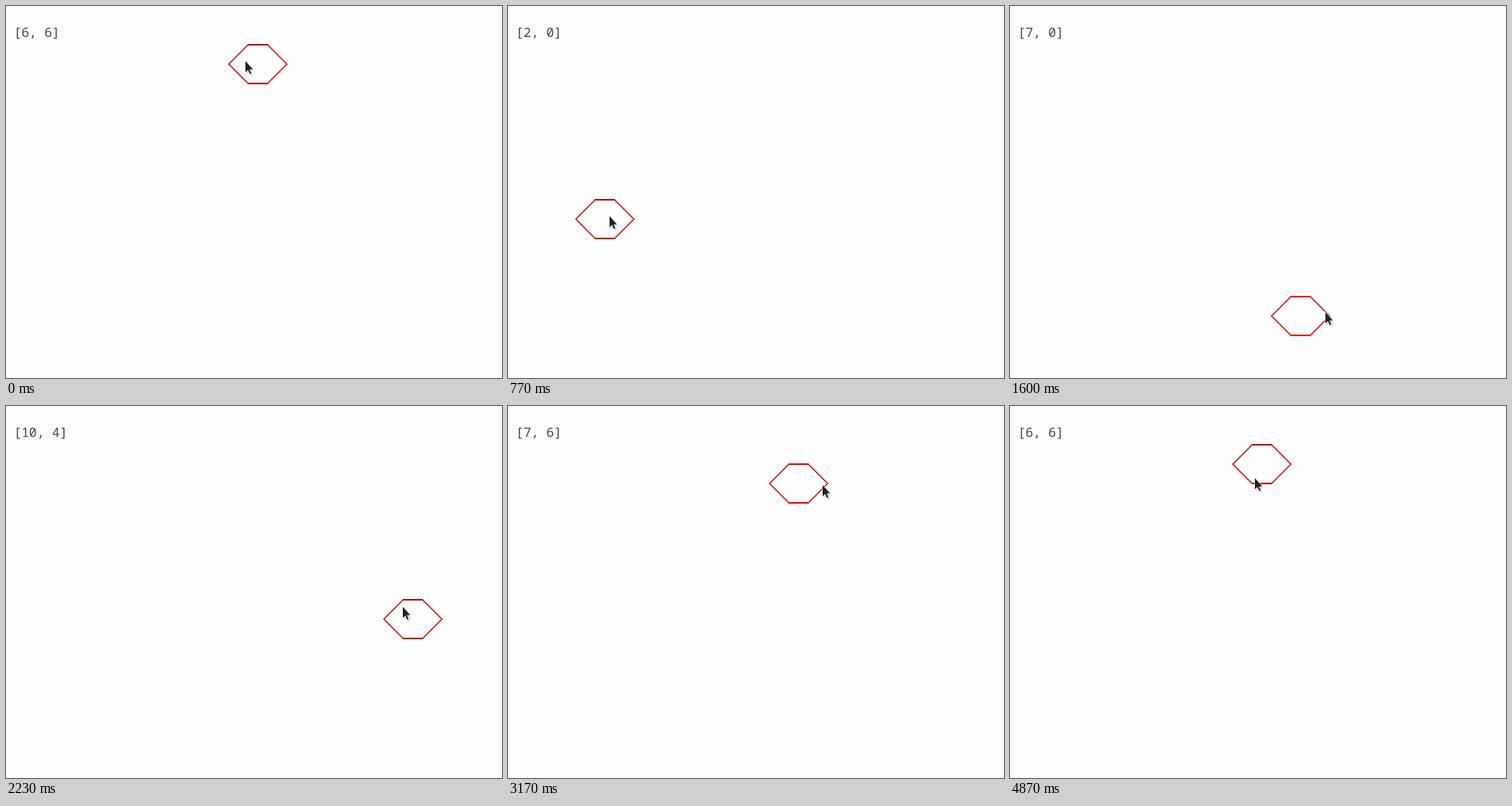
Recreate the animation shown at these times as an HTML page. Size 640 px wide and 480 px high, loop 6.76 s.

```html
<!DOCTYPE html>
<html lang="en">
<head>
<meta charset="utf-8">
<title>Hex grid picking</title>
<style>
  html, body { margin: 0; width: 100%; height: 100%; overflow: hidden; background: #fdfdfd; }
  svg { display: block; width: 640px; height: 480px; }
  text { font: 300 16.5px "Noto Sans Mono", "DejaVu Sans Mono", monospace; fill: #444; white-space: pre; }
  #cell { fill: none; stroke: #cc0a0a; stroke-width: 1.5; }
  #flats { stroke-width: 2; }
  #shadow { fill: #777; opacity: .5; filter: blur(1px); }
</style>
</head>
<body>
<svg viewBox="0 0 640 480">
  <defs>
    <path id="arrow" d="M0 0V14.5L3.3 11.5L5.6 16.8L7.6 16L5.3 10.8H9.6Z"/>
  </defs>
  <text id="label" x="10" y="40"></text>
  <g id="cell">
    <path d="M-12.5 -25L-37.5 0L-12.5 25M12.5 -25L37.5 0L12.5 25"/>
    <path id="flats" d="M-13 -25H13M-13 25H13"/>
  </g>
  <g id="pointer">
    <use id="shadow" href="#arrow" x="1.5" y="2"/>
    <use href="#arrow" fill="#222" stroke="#fff" stroke-width="1.2" paint-order="stroke"/>
  </g>
</svg>
<script>
const LOOP = 6760;

// Turning points of the pointer: time in ms, x, y
const path = [
  [0, 309, 70], [400, 165, 128], [770, 131, 271], [1060, 245, 345], [1350, 382, 411],
  [1600, 407, 394], [2080, 515, 305], [2230, 512, 259], [2670, 451, 167], [3400, 385, 89],
  [3730, 346, 97], [4000, 320, 102], [4660, 320, 102], [4870, 316, 92]
];

const label = document.getElementById("label");
const cell = document.getElementById("cell");
const flats = document.getElementById("flats");
const pointer = document.getElementById("pointer");

// Slope at a path point; zero where the value turns, so that rests stay still
function slope(i, k) {
  if (i === 0 || i === path.length - 1) return 0;
  const [a, b, c] = path.slice(i - 1, i + 2);
  const before = (b[k] - a[k]) / (b[0] - a[0]);
  const after = (c[k] - b[k]) / (c[0] - b[0]);
  return before * after > 0 ? 2 * before * after / (before + after) : 0;
}

function hermite(i, k, t) {
  const p = path[i], q = path[i + 1];
  const span = q[0] - p[0], u = (t - p[0]) / span, v = 1 - u;
  return v * v * ((1 + 2 * u) * p[k] + u * span * slope(i, k))
       + u * u * ((1 + 2 * v) * q[k] - v * span * slope(i + 1, k));
}

function position(t) {
  const i = path.findIndex(p => p[0] > t) - 1;
  if (i < 0) return path[path.length - 1].slice(1);
  return [hermite(i, 1, t), hermite(i, 2, t)].map(Math.round);
}

// The cell whose hexagon holds the point
function pick(x, y) {
  let best = { d: Infinity };
  const near = Math.round((x - 25) / 50);
  for (let a = near - 1; a <= near + 1; a++) {
    const b = Math.round((225 + 25 * a - y) / 50);
    const cx = 25 + 50 * a, cy = 225 + 25 * a - 50 * b;
    const dx = Math.abs(x - cx), dy = Math.abs(y - cy);
    const d = Math.max(dy / 25, (dx + dy) / 37.5);
    if (d < best.d) best = { d, a, b, cx, cy };
  }
  return best;
}

// Thirty pictures a second, on a 10 ms clock
const snap = t => Math.floor((Math.floor(t / 10) * 10 + 3.4) * 0.03) / 0.03;

function draw(now) {
  const [x, y] = position(snap(now % LOOP) + 0.001);
  const { a, b, cx, cy } = pick(x, y + 1);
  label.textContent = `[${a}, ${b}]`;
  cell.setAttribute("transform", `translate(${cx} ${cy})`);
  flats.setAttribute("stroke", a % 2 ? "#f00000" : "#b00808");
  pointer.setAttribute("transform", `translate(${x} ${y + 1})`);
}

const start = performance.now();
function tick() {
  draw(performance.now() - start);
  requestAnimationFrame(tick);
}
tick();
</script>
</body>
</html>
```
